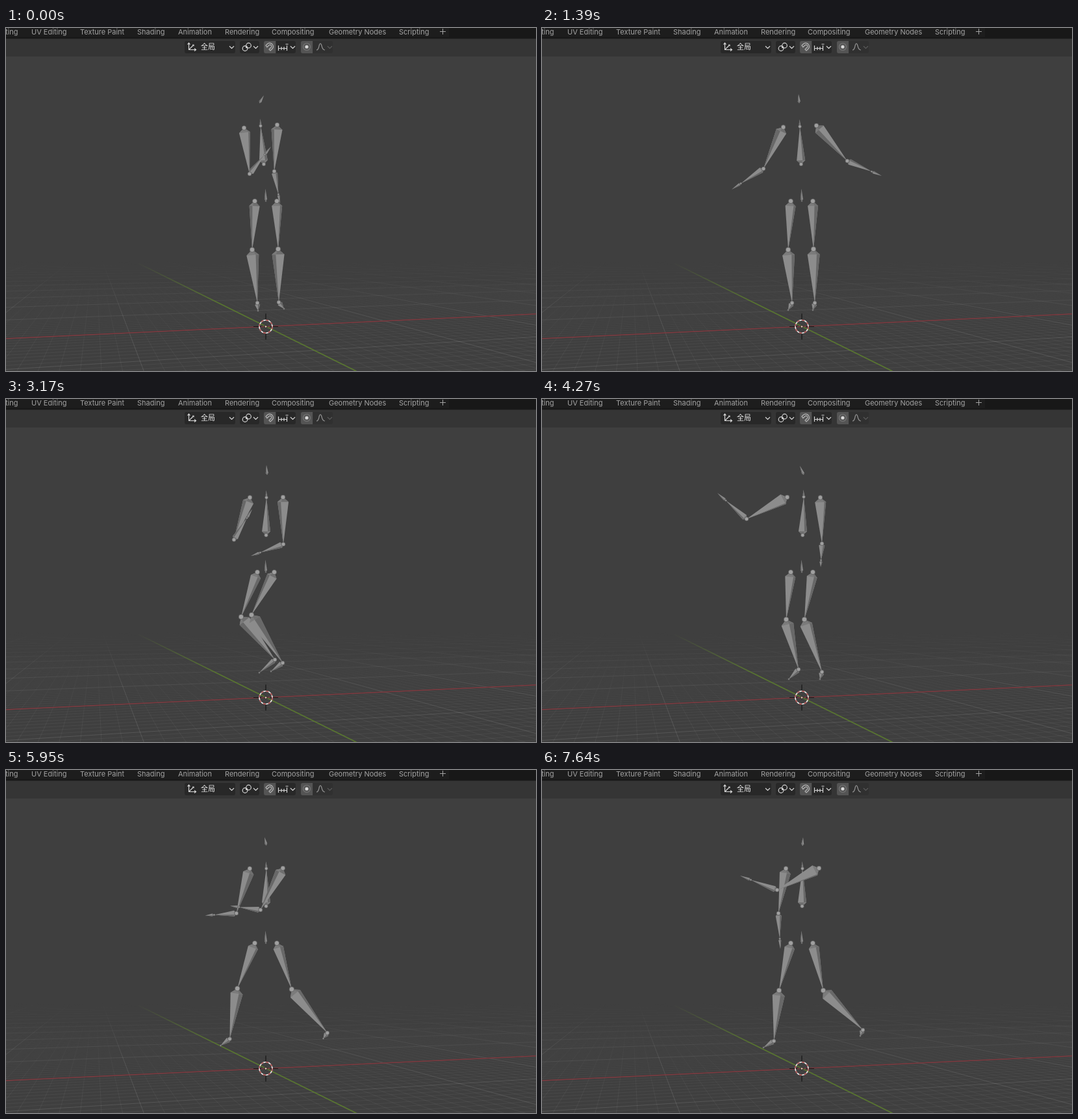
Recreate the animation shown at these times as an HTML page with a canvas. Size 816 by 529 pixels, loop 7730 ms.

```html
<!DOCTYPE html>
<html lang="en">
<head>
<meta charset="utf-8">
<title>Armature dance</title>
<style>
html, body { margin: 0; width: 100%; height: 100%; overflow: hidden; background: #3f3f3f; }
canvas, svg { position: absolute; left: 0; top: 0; width: 816px; height: 529px; }
text { font: 11px Inter, sans-serif; fill: #a3a3a3; }
.cjk { font: 11px "Noto Sans CJK SC", "Noto Sans CJK", sans-serif; fill: #e8e8e8; }
.icon { fill: none; stroke: #d6d6d6; stroke-width: 1.2; }
</style>
</head>
<body>
<canvas id="floor" width="816" height="529"></canvas>
<canvas id="rig" width="816" height="529"></canvas>
<svg viewBox="0 0 816 529">
  <rect width="816" height="44" fill="#353535"/>
  <rect width="816" height="16.5" fill="#181818"/>
  <rect width="682" height="14" fill="#1d1d1d"/>
  <g id="tabs"><text x="18.5" y="10" text-anchor="end">Sculpting</text></g>
  <path d="M668 5.5h9M672.5 1v9" stroke="#a3a3a3"/>
  <g fill="#282828">
    <rect x="275" y="20" width="78" height="19" rx="3"/>
    <rect x="360" y="20" width="30" height="19" rx="3"/>
    <path d="M416 20h27q3 0 3 3v13q0 3-3 3h-27z"/>
    <path d="M473 20h27q3 0 3 3v13q0 3-3 3h-27z" fill="#303030"/>
  </g>
  <path d="M415 20h-15q-3 0-3 3v13q0 3 3 3h15zM472 20h-15q-3 0-3 3v13q0 3 3 3h15z" fill="#545454"/>
  <text class="cjk" x="300" y="33">全局</text>
  <g class="icon">
    <path d="M281.500 34V23m-2 2.500 2-2.500 2 2.500M281.500 33.500h11m-2.500-2 2.500 2-2.500 2M282 33l6-6m-1-1h2v2"/>
    <path d="M344 28l3.500 3.500 3.500-3.500M381 28l3.500 3.500 3.500-3.500M438 28l3.500 3.500 3.500-3.500"/>
    <circle cx="368" cy="31.500" r="3.800"/><circle cx="373.500" cy="27" r="3.800"/>
    <circle cx="370.500" cy="29.500" r="1" fill="#ddd"/>
    <path d="M400 27l3-3q4-2 7 1 3 4 0 7l-3 3-2-2 3-3q2-2 0-3.500-1.500-1.500-3.500.5l-2.500 2.500z" stroke="#b5b5b5"/>
    <path d="M419.500 27v8M424 29v5M428 29v5M432.500 27v8M419 31.500h14M430.500 25h4"/>
    <circle cx="463" cy="29" r="5.500" stroke="#777"/><circle cx="463" cy="29" r="2" fill="#ddd"/>
    <path d="M478 34c5 0 3-10 6-10s1 10 7 10" stroke="#969696"/>
    <path d="M495 28l3.500 3.500 3.500-3.500" stroke="#5a5a5a"/>
  </g>
  <g fill="none" transform="translate(400 460.500)">
    <path d="M-19 0h12M7 0h12M0-20v12M0 8v12" stroke="#151515" stroke-width="1.200"/>
    <circle r="10" stroke="#eee" stroke-width="1.500"/>
    <circle r="10" stroke="#b04444" stroke-width="1.500" stroke-dasharray="3.927"/>
    <circle r="2" fill="#d8b8a8" stroke="#222"/>
  </g>
</svg>
<script>
const LOOP = 7730, HOLD = 350, STEP = 68.77;
const mix = (a, b, k) => a.map((v, i) => v + (b[i] - v) * k);

const tabs = { 'UV Editing': 39, 'Texture Paint': 114, Shading: 202, Animation: 265, Rendering: 337,
  Compositing: 409, 'Geometry Nodes': 497, Scripting: 605 };
for (const name in tabs) {
  const el = document.createElementNS('http://www.w3.org/2000/svg', 'text');
  el.setAttribute('x', tabs[name]);
  el.setAttribute('y', 10);
  el.textContent = name;
  document.getElementById('tabs').append(el);
}

// Perspective floor: two vanishing points on one horizon
const fc = document.getElementById('floor').getContext('2d');
const origin = [400, 460.5], horizon = 330, vanX = 3190, vanY = 137, kx = .07, ky = .22;

function project(u, v) {
  const a = u * kx, b = v * ky, d = 1 + a + b;
  return [(origin[0] + a * vanX + b * vanY) / d, (origin[1] + (a + b) * horizon) / d];
}
function fade(rgb, alpha, top, bottom) {
  const g = fc.createLinearGradient(0, top, 0, bottom);
  g.addColorStop(0, `rgba(${rgb},0)`);
  g.addColorStop(1, `rgba(${rgb},${alpha})`);
  return g;
}
function floorLine(a, b, style, width) {
  fc.strokeStyle = style;
  fc.lineWidth = width;
  fc.beginPath();
  fc.moveTo(...a);
  fc.lineTo(...b);
  fc.stroke();
}
function grid(step, extent, style) {
  for (let i = -extent; i <= extent; i++) {
    const c = i * step;
    const v = d => (d - 1 - c * kx) / ky, u = d => (d - 1 - c * ky) / kx;
    floorLine(project(c, v(.4)), project(c, v(12)), style, 1);
    floorLine(project(u(.4), c), project(u(12), c), style, 1);
  }
}
grid(.1, 120, fade('255,255,255', .05, 385, 500));
grid(1, 30, fade('255,255,255', .07, 358, 440));
floorLine([0, 479], [816, 441], '#7d383e', 1.3);
floorLine([200, 361], [540, 529.5], fade('88,118,46', 1, 362, 425), 1.6);

// Sparse keys per joint; suffixes L and R are screen left and right
const tracks = {};
function pose(time, joints) {
  for (const name in joints) (tracks[name] ||= []).push([time, joints[name]]);
}
pose(281, { head: [397, 104, 390, 116], neck: [392, 151], hips: [383, 417],
  armL: [375, 225, 408, 183], armR: [413, 221, 422, 271],
  legL: [379, 342, 387, 424, 388, 436], legR: [419, 341, 420, 423, 428, 433],
  ridge: [.7, -.5, -.4, .6, .5, -.4] });
pose(1120, { armL: [342, 217, 294, 252], armR: [460, 210, 502, 238] });
pose(1390, { head: [395, 102, 396, 116], neck: [397, 152], hips: [383, 417],
  armL: [341, 217, 292, 249], armR: [470, 205, 523, 228],
  legL: [379, 342, 385, 424, 379, 435], legR: [418, 341, 420, 424, 417, 435],
  ridge: [-.2, -.2, .6, .3, .5, .5] });
pose(1650, { armL: [335, 212, 282, 238], armR: [466, 207, 516, 232] });
pose(2000, { armL: [350, 220, 327, 252], armR: [438, 221, 445, 262],
  legL: [379, 342, 387, 424, 380, 435], legR: [416, 341, 420, 424, 416, 435] });
pose(3170, { head: [401, 102, 402, 117], neck: [401, 152], hips: [387, 413],
  armL: [351, 217, 379, 170], armR: [427, 224, 377, 242],
  legL: [362, 336, 414, 402, 390, 422], legR: [378, 333, 426, 407, 408, 420],
  ridge: [-.4, -.4, .4, -.5, -.3, 0] });
pose(3600, { armL: [350, 216, 352, 178], armR: [431, 223, 412, 258] });
pose(3950, { armR: [446, 217, 473, 248] });
pose(4270, { head: [397, 103, 403, 117], neck: [403, 151], hips: [383, 417],
  armL: [315, 185, 270, 145], armR: [431, 223, 429, 259],
  legL: [376, 340, 395, 417, 380, 432], legR: [404, 340, 431, 421, 428, 432],
  ridge: [.8, .7, .6, .4, .3, .6] });
pose(4450, { armL: [309, 180, 253, 148] });
pose(4850, { armR: [461, 207, 514, 222] });
pose(5320, { head: [394, 102, 393, 116], neck: [395, 152],
  armL: [355, 223, 309, 187], armR: [389, 215, 336, 236],
  legL: [355, 337, 337, 414, 323, 423], legR: [437, 339, 489, 408, 484, 417],
  ridge: [.5, -.3, .6, .4, .4, .6] });
pose(5700, { armL: [348, 220, 292, 205] });
pose(6150, { armL: [362, 222, 322, 245] });
pose(6680, { head: [404, 106, 412, 117], neck: [409, 152],
  armL: [383, 220, 360, 273], armR: [396, 217, 358, 172],
  legL: [358, 337, 355, 416, 341, 428], legR: [444, 337, 503, 402, 495, 410],
  ridge: [-.2, -.3, .6, .3, .3, .5] });
pose(7250, { armR: [346, 186, 263, 164] });
pose(7640, { head: [402, 104, 401, 117], neck: [401, 152], hips: [383, 417],
  armL: [364, 221, 367, 276], armR: [362, 185, 305, 163],
  legL: [365, 340, 357, 418, 341, 428], legR: [433, 340, 494, 401, 490, 410],
  ridge: [.3, .8, .5, .4, .3, .5] });

function sample(keys, t) {
  const i = keys.findIndex(k => k[0] > t);
  if (i === 0) return keys[0][1];
  if (i < 0) return keys.at(-1)[1];
  const [t0, a] = keys[i - 1], [t1, b] = keys[i], k = (t - t0) / (t1 - t0);
  return mix(a, b, k * k * (3 - 2 * k));
}

const ctx = document.getElementById('rig').getContext('2d');
function face(color, ...points) {
  ctx.fillStyle = color;
  ctx.beginPath();
  points.forEach(p => ctx.lineTo(...p));
  ctx.fill();
}
function ball(p, r) {
  ctx.beginPath();
  ctx.arc(...p, r, 0, 7);
  ctx.fillStyle = '#a0a0a0';
  ctx.fill();
  ctx.strokeStyle = '#565656';
  ctx.lineWidth = .7;
  ctx.stroke();
}
// Octahedral bone: head a, tail b, ring width, ridge position across the ring
function bone(a, b, width, ridge = .4, r = 0) {
  const dx = b[0] - a[0], dy = b[1] - a[1], len = Math.hypot(dx, dy) || 1;
  const ring = Math.max(.1 * len, Math.min(3, len / 3)) / len;
  const across = k => [a[0] + dx * ring + dy / len * width / 2 * k, a[1] + dy * ring - dx / len * width / 2 * k];
  const left = across(-1), right = across(1), mid = across(ridge);
  const light = '#8c8c8c', dark = '#686868';
  face(light, a, left, b, right);
  if (ridge < 0) face(dark, left, mid, b);
  else face(dark, mid, right, b);
  face('#7b7b7b', a, left, mid);
  face('#6f6f6f', a, mid, right);
  if (r) ball(a, r);
}

function drawArm(shoulder, arm, ridge) {
  const elbow = arm.slice(0, 2), hand = arm.slice(2), wrist = mix(elbow, hand, .71);
  bone(shoulder, elbow, 17, ridge, 3.4);
  bone(elbow, wrist, 9, .4, 3);
  bone(wrist, hand, 4, .3, 1.4);
}
function drawLeg(hip, leg, thighRidge, shinRidge) {
  const knee = leg.slice(0, 2), ankle = leg.slice(2, 4), toe = leg.slice(4);
  bone(ankle, toe, 8, .2, 3);
  bone(knee, ankle, 19, shinRidge);
  bone(hip, knee, 16, thighRidge, 3.6);
  ball(knee, 3.8);
  ball(toe, 1.2);
}
function draw(t) {
  const p = {};
  for (const name in tracks) p[name] = sample(tracks[name], t);
  const [x, y] = p.neck, tilt = Math.max(-3, Math.min(3, (x - 401) * .35));
  const chest = [400.5 + (x - 401) * .4, 210];
  ctx.clearRect(0, 0, 816, 529);
  bone(p.head.slice(2), p.head.slice(0, 2), 4, .3);
  bone(chest, p.neck, 13, -.4, 2.8);
  bone(p.neck, [x - .5, y - 11], 2.5, 0, 2.4);
  bone([400, 267], [399.5, 248], 4, .2, 1);
  drawLeg([p.hips[0], 267], p.legL, p.ridge[2], p.ridge[4]);
  drawLeg([p.hips[1], 267], p.legR, p.ridge[3], p.ridge[5]);
  drawArm([x - 25.5, 152 - tilt * .7], p.armL, p.ridge[0]);
  drawArm([x + 25.5, 151.5 + tilt * .7], p.armR, p.ridge[1]);
}

function frame(now) {
  const t = now % LOOP;
  draw(t < HOLD ? 0 : Math.min(7640, HOLD + Math.floor((t - HOLD) / STEP + .1) * STEP));
  requestAnimationFrame(frame);
}
requestAnimationFrame(frame);
</script>
</body>
</html>
```
